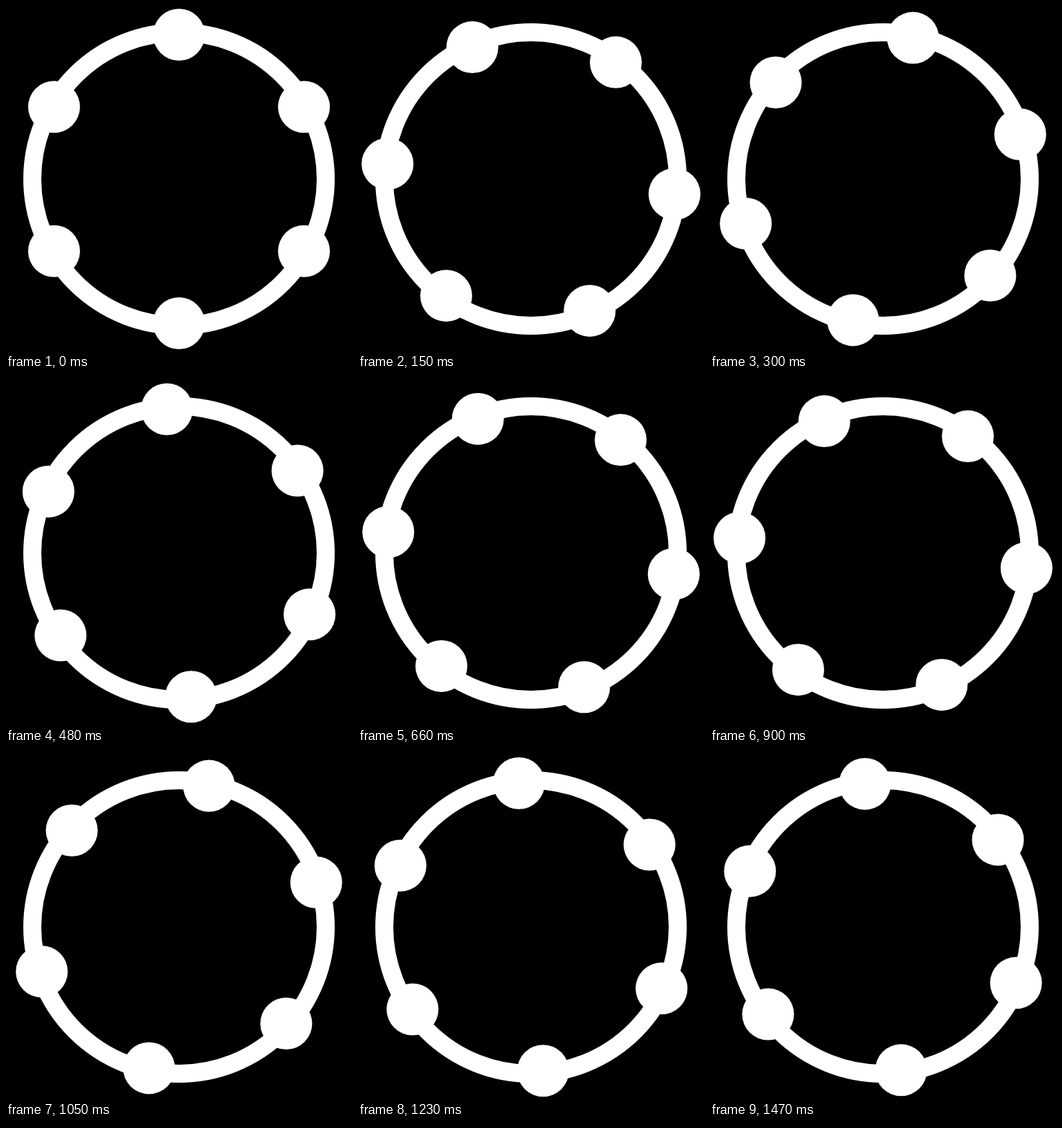
Write an HTML page with a canvas that moves like this. It is 500 by 500 pixels and loops after 1500 ms.

```html
<!DOCTYPE html>
<html lang="en">
<head>
<meta charset="utf-8">
<title>Rotating ring</title>
<style>
  html, body { margin: 0; width: 100%; height: 100%; overflow: hidden; background: #000; }
  canvas { display: block; }
</style>
</head>
<body>
<canvas id="stage" width="500" height="500"></canvas>
<script>
  const ctx = document.getElementById('stage').getContext('2d');
  const CENTER = 250;
  const RING = { radius: 212, width: 26 };
  const DOTS = { count: 6, orbit: 208.5, radius: 37.5 };
  const STEP_MS = 30;
  const STEPS = 50;
  const TURN = Math.PI * 2;

  function draw(step) {
    ctx.fillStyle = '#000';
    ctx.fillRect(0, 0, 500, 500);

    ctx.strokeStyle = ctx.fillStyle = '#fff';
    ctx.lineWidth = RING.width;
    ctx.beginPath();
    ctx.arc(CENTER, CENTER, RING.radius, 0, TURN);
    ctx.stroke();

    for (let i = 0; i < DOTS.count; i++) {
      const angle = TURN * (step / STEPS + i / DOTS.count);
      const x = CENTER + DOTS.orbit * Math.sin(angle);
      const y = CENTER - DOTS.orbit * Math.cos(angle);
      ctx.beginPath();
      ctx.arc(x, y, DOTS.radius, 0, TURN);
      ctx.fill();
    }
  }

  // One full clockwise turn per loop, advancing in even steps.
  const start = performance.now();
  function tick(now) {
    const elapsed = Math.max(0, now - start);
    draw(Math.floor((elapsed + 0.5) / STEP_MS) % STEPS);
    requestAnimationFrame(tick);
  }
  tick(start);
</script>
</body>
</html>
```
